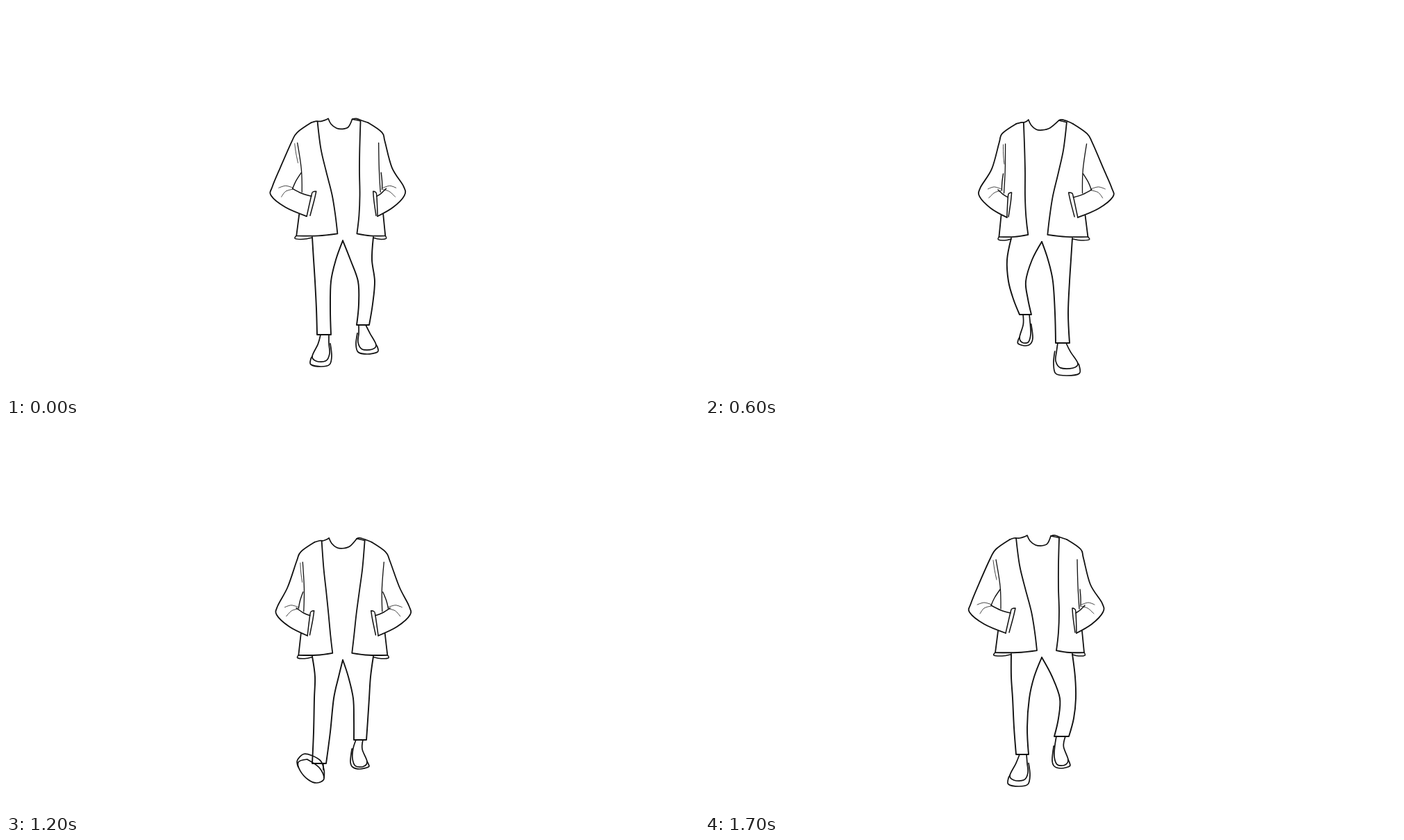
Animation of 998x561 px, one loop 1800 ms. Source, as an HTML page with a canvas:

```html
<!DOCTYPE html>
<html lang="en">
<head>
<meta charset="utf-8">
<title>Walking outfit</title>
<style>
html, body { margin: 0; width: 100%; height: 100%; overflow: hidden; background: #fff; }
canvas { display: block; width: 100%; height: 100%; }
</style>
</head>
<body>
<canvas id="stage" width="998" height="561"></canvas>
<script>
const LOOP = 1800, STEP = 100, TURN = 2 * Math.PI / LOOP;
const ctx = document.getElementById('stage').getContext('2d');
const parse = text => text.trim().split(/\s+/).map(item => item.split(',').map(Number));

const sway = t => (1 + Math.sin(TURN * (t - 330))) / 2;
const bob = t => 2 + 2 * Math.cos(2 * TURN * (t - 370));

// Jacket points: x, y, sideways travel over one sway.
const line = (width, text, corners = []) => ({ width, pts: parse(text), corners });
const half = [
  line(1.8, '439,168,10 419,182,10 411,195,14 394,233,21 383,260,15 381,273,16 402,290,11 433,303,2'),
  line(1.3, '419,197,15 425,235,8 426,268,5'),
  line(1.4, '425,240,5 417,252,12 412,263,17'),
  line(1.5, '412,263,11 426,270,4 440,274,-4'),
  line(1.5, '433,303,2 440,273,-4 442,268,-4 447,267,-6 444,280,-4 438,302,-1', [3]),
  line(0.8, '392,262,17 402,259,16 413,262,15'),
  line(0.8, '396,275,14 402,267,17 412,264,18'),
  line(1.8, '448,166,12 453,205,8 461,238,0 470,272,-10 475,302,-14 478,328,-14 450,331,-5 418,331,6 422,300,5', [5, 7]),
  line(1.5, '418,331,6 416,335,7 428,336,4 440,334,1')
];
const collar = [
  line(1.7, '439,168,10 445,166,12 453,166,7 460,164,4 464,162,2 468,170,2 476,176,1 485,177,0 493,174,4 498,163,13', [4]),
  line(1.7, '498,163,13 504,162,11 512,165,13 521,168,10'),
  line(1.5, '498,163,13 508,165,11 510,166,12'),
  line(0.8, '415,198,16 417,212,14 420,226,12')
];

// Trouser leg: time, hem y, hem outer and inner x, outer x downwards, inner x upwards.
const legKeys = parse(`
0,474,448,468,443,445,447,467,468,475
100,471,453,470,448,449,451,470,473,479
300,457,451,469,445,447,449,469,470,477
400,453,453,472,443,445,449,467,472,477
600,445,453,470,435,437,444,465,462,471
800,452,446,467,437,436,439,461,459,470
900,460,447,465,443,439,442,462,463,474
1000,481,438,460,441,439,440,462,467,477
1200,491,441,461,445,444,443,467,472,479
1300,482,440,464,440,440,441,467,472,477
1500,486,445,465,443,445,447,466,469,476
1700,478,448,466,441,443,445,464,467,474`);

// Shoe: time, left, right, bottom, then sole depth (flat) or height (toe raised).
const shoeKeys = parse(`
0,441,466,513,7
100,444,468,508,5
300,450,471,496,3
400,454,474,494,5
600,453,469,486,4
800,447,467,494,4
900,437,463,496,6
1000,425,457,508,22
1200,421,458,519,34
1300,421,459,522,35
1400,429,462,527,10
1500,433,465,523,10
1700,439,465,516,8`);

// Unit shapes inside the shoe box.
const flatUpper = parse('.33,.35 0,.8 .24,.98 .78,.97 1,.7 .96,.33');
const raisedUpper = parse('.34,0 0,.12 .07,.48 .38,.86 .72,1 1,.82 .82,.36 .34,0');
const raisedSole = parse('-.01,.32 -.04,.05 .2,-.22 .52,-.16 .87,.07 1,.45 1,.78');

function keyed(keys, t) {
  const looped = [...keys, [LOOP, ...keys[0].slice(1)]];
  const n = looped.findIndex(k => k[0] > t), a = looped[n - 1], b = looped[n];
  const f = (t - a[0]) / (b[0] - a[0]);
  return a.map((v, i) => v + (b[i] - v) * f).slice(1);
}

function curve(pts, width, corners = []) {
  const last = pts.length - 1;
  const tangent = i => i === 0 || i === last || corners.includes(i)
    ? [0, 0]
    : [0, 1].map(k => (pts[i + 1][k] - pts[i - 1][k]) / 6);
  ctx.lineWidth = width;
  ctx.beginPath();
  ctx.moveTo(pts[0][0], pts[0][1]);
  for (let i = 1; i <= last; i++) {
    const [ax, ay] = pts[i - 1], [bx, by] = pts[i], [ux, uy] = tangent(i - 1), [vx, vy] = tangent(i);
    ctx.bezierCurveTo(ax + ux, ay + uy, bx - vx, by - vy, bx, by);
  }
  ctx.stroke();
}

function drawCloth(parts, t) {
  const s = sway(t), dy = bob(t);
  for (const { width, pts, corners } of parts)
    curve(pts.map(([x, y, dx]) => [x + dx * s, y + dy]), width, corners);
}

function drawLeg(t) {
  const [hem, hemOut, hemIn, out1, out2, out3, in3, in2, in1] = keyed(legKeys, t);
  const dy = bob(t), shin = (400 + hem) / 2;
  curve([[441, 333 + dy], [out1, 366], [out2, 397], [out3, shin], [hemOut, hem],
    [hemIn, hem], [in3, shin], [in2, 397], [in1, 366], [485, 338 + dy]], 1.9, [4, 5]);

  const [left, right, bottom, depth] = keyed(shoeKeys, t);
  const raised = t >= 1000 && t <= 1300;
  const top = raised ? bottom - depth : hem;
  const fit = ([u, v]) => [left + u * (right - left), top + v * (bottom - top)];
  if (raised) {
    curve(raisedUpper.map(fit), 1.7);
    curve(raisedSole.map(fit), 1.7);
    curve([[right - 1, hem], fit([.97, .45])], 1.5);
  } else {
    const base = bottom + depth;
    curve([[hemOut + 5, hem], ...flatUpper.map(fit), [hemIn - 3, hem]], 1.7);
    curve([fit([0, .8]), [left - 2, bottom - 4], [left - 2, base - 3], [(left + right) / 2, base],
      [right, base - 3], [right + 3, bottom - 8], fit([1.04, .33])], 1.7);
  }
}

function drawSide(t) {
  drawCloth(half, t);
  drawLeg(t);
}

function draw() {
  const t = Math.floor(performance.now() % LOOP / STEP) * STEP;
  ctx.clearRect(0, 0, 998, 561);
  ctx.strokeStyle = '#111';
  ctx.lineCap = ctx.lineJoin = 'round';
  drawCloth(collar, t);
  drawSide(t);
  // The other side is mirrored, half a loop later.
  ctx.save();
  ctx.translate(970, 0);
  ctx.scale(-1, 1);
  drawSide((t + LOOP / 2) % LOOP);
  ctx.restore();
  requestAnimationFrame(draw);
}
draw();
</script>
</body>
</html>
```
